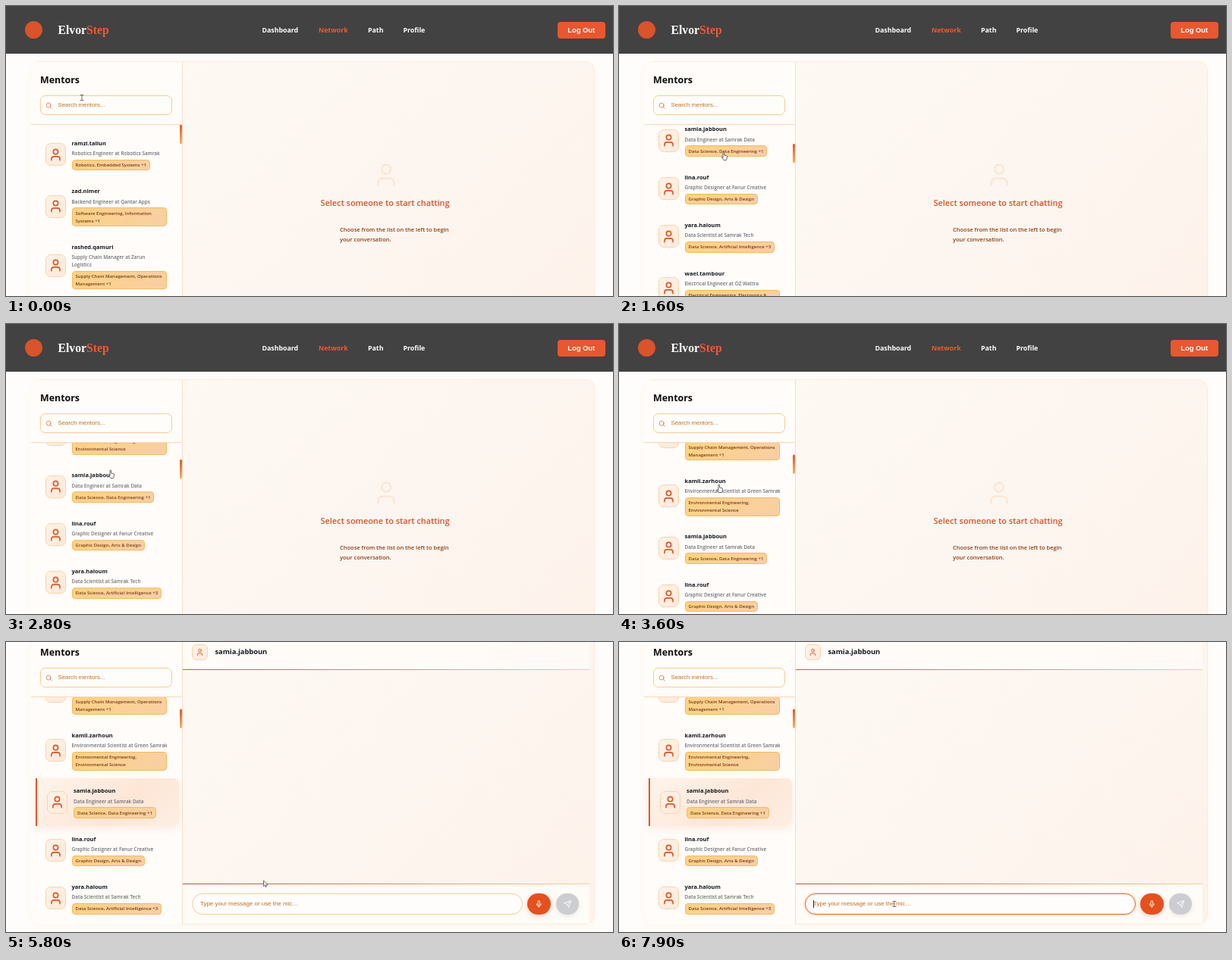
Animation, 800 px wide and 383 px high, one loop 8000 ms. Source, as an HTML page:

```html
<!DOCTYPE html>
<html lang="en">
<head>
<meta charset="utf-8">
<title>Mentor chat</title>
<style>
:root { --hot: #e5552b; --ink: #14181f; }
html, body { margin: 0; width: 100%; height: 100%; overflow: hidden; background: #fffdfb; }
body { position: relative; font-family: "Open Sans", "Noto Sans", sans-serif; }
#stage { position: absolute; left: 0; top: 0; width: 800px; height: 383px; overflow: hidden; }
#page { position: absolute; left: 0; top: 0; width: 800px; height: 467px; animation: page 8s linear infinite; }
#page *, .cursor { box-sizing: border-box; }
.at { position: absolute; }
.t { position: absolute; white-space: nowrap; line-height: 14px; font-weight: 600; }
.arial { font-family: "Liberation Sans", Arial, sans-serif; font-weight: 400; color: #c0701f; }
svg { display: block; fill: none; stroke: currentColor; stroke-width: 2; stroke-linecap: round; stroke-linejoin: round; }

/* top bar */
.bar { left: 0; top: 0; width: 800px; height: 63px; background: #424242; color: #fff; }
.bar .t { font-size: 8.8px; font-weight: 700; top: 25px; }
.bar .brand { left: 68.5px; top: 22px; font: 700 15.7px/19px "Liberation Serif", Times, serif; }
.brand b, .bar .on { color: #ee5a33; }
.logo { left: 25px; top: 20px; width: 23px; height: 23px; border-radius: 50%; background: #d9532b; }
.out { left: 726.5px; top: 21px; width: 63.5px; height: 21.5px; border-radius: 4px; background: #e8572f;
  font: 700 9.4px/21.5px "Liberation Sans", Arial, sans-serif; text-align: center; }

/* panel */
.panel { left: 32.5px; top: 73px; width: 743.5px; height: 384px; border: 1px solid #fdebdd; border-radius: 12px;
  background: linear-gradient(135deg, #fffaf5, #fdf6f0 55%, #fdf2ea); box-shadow: 0 2px 10px rgba(240,150,90,.07); }
.side { left: 33px; top: 74px; width: 199.5px; height: 382.5px; border-right: 1.5px solid #fbdcc4;
  border-radius: 11px 0 0 11px; background: #fffcf9; }
.search { left: 45px; top: 118px; width: 174px; height: 26px; border: 1px solid #f8cb94; border-radius: 7px; background: #fffdfa; }
.rule { left: 33px; top: 156px; width: 198px; height: 1.4px; background: #fbd6b4; }

/* mentor list */
.view { left: 33px; top: 157.4px; width: 198px; height: 299px; overflow: hidden; border-radius: 0 0 0 11px; }
.list { position: absolute; left: 5.5px; top: 7.6px; width: 189.5px; animation: list 8s linear infinite; }
.item { position: relative; display: flex; align-items: center; padding: 10px 0 10px 13px; margin-bottom: .9px; }
.face { flex: none; width: 27px; height: 30px; margin-right: 8px; border: 1px solid #fbd2ae; border-radius: 7px;
  background: linear-gradient(135deg, #fff3e6, #fdeadb); color: #dd5429; display: flex; align-items: center; justify-content: center; }
.face svg { width: 19px; height: 19px; }
.item > div { position: relative; }
.name { font-weight: 700; font-size: 7.5px; line-height: 13px; color: var(--ink); }
.role { margin: 2.2px 0 2.8px; font-weight: 600; font-size: 6.4px; line-height: 10px; color: #6d7078; white-space: nowrap; }
.tag { display: block; width: fit-content; padding: 1.25px 4px; border: 1px solid #f4b95c; border-radius: 4px;
  background: linear-gradient(135deg, #fcd284, #f9cfa4); font-weight: 600; font-size: 6.05px; line-height: 10px; color: #7a3813; white-space: nowrap; }
.tag.two { width: 125.5px; }
.picked { animation: nudge 8s linear infinite; }
.picked::before { content: ""; position: absolute; inset: 0; border-left: 2.5px solid var(--hot); border-radius: 0 8px 8px 0;
  background: linear-gradient(135deg, #fff4eb, #fde6d6 60%, #fdeee3); box-shadow: 0 4px 10px rgba(235,120,60,.12); animation: glow 8s linear infinite; }
.thumb { left: 228.5px; top: 157.3px; width: 3.2px; height: 24.5px; border-radius: 1px;
  background: linear-gradient(#e5552b, #f9b25f); animation: thumb 8s linear infinite; }

/* chat side */
.intro { animation: intro 8s step-end infinite; }
.chat { animation: chat 8s step-end infinite; }
.load { animation: load 8s step-end infinite; }
.send { animation: send 8s step-end infinite; }
.top { left: 232.5px; top: 74px; width: 536.5px; height: 46px; background: linear-gradient(90deg, #fffcf9, #fffaf5); }
.line { left: 232.5px; width: 536.5px; height: 1px; }
.foot { left: 232.5px; top: 404px; width: 536.5px; height: 52px; background: #fffbf7; }
.box { left: 245px; top: 416px; width: 436px; height: 28px; border: 1px solid #f8cb9c; border-radius: 14px; background: #fffdfb; }
.focus { border: 1.5px solid #e8632f; box-shadow: 0 0 0 1.5px #fde3d2; animation: focus 8s step-end infinite; }
.caret { left: 256px; top: 425px; width: .8px; height: 10px; background: #222; animation: caret 8s step-end infinite; }
.btn { top: 416px; width: 30.8px; height: 28px; border-radius: 14px; color: #fff; display: flex; align-items: center; justify-content: center; }
.btn svg { width: 10.5px; height: 10.5px; }

/* pointer */
.cursor { position: absolute; left: -8px; top: -8px; width: 16px; height: 16px; animation: move 8s linear infinite; }
.cursor svg { position: absolute; left: 0; top: 0; width: 16px; height: 16px; stroke: #444; stroke-width: .8; }
.beam { animation: beam 8s step-end infinite; }
.hand { fill: #fff; animation: hand 8s step-end infinite; }
.arrow { fill: #fff; animation: arrow 8s step-end infinite; }

@keyframes page {
  0%, 64.6% { transform: translateY(0); animation-timing-function: ease-in-out; }
  69.6%, 100% { transform: translateY(-84px); }
}
@keyframes list {
  0%, 8.75% { transform: translateY(0); animation-timing-function: ease-in-out; }
  18.5%, 33% { transform: translateY(-312px); animation-timing-function: ease-in-out; }
  35% { transform: translateY(-275px); }
  40.5%, 100% { transform: translateY(-194px); }
}
@keyframes thumb {
  0%, 8.75% { transform: translateY(0); animation-timing-function: ease-in-out; }
  18.5%, 33% { transform: translateY(25.2px); animation-timing-function: ease-in-out; }
  35% { transform: translateY(22.2px); }
  40.5%, 100% { transform: translateY(15.7px); }
}
@keyframes nudge {
  0%, 49% { padding-left: 13px; }
  51.5%, 100% { padding-left: 15.5px; }
}
@keyframes glow {
  0%, 49% { opacity: 0; }
  51.5%, 100% { opacity: 1; }
}
@keyframes intro { 0% { opacity: 1; } 52.5%, 100% { opacity: 0; } }
@keyframes chat { 0% { opacity: 0; } 52.5%, 100% { opacity: 1; } }
@keyframes load { 0% { opacity: 0; } 52.5% { opacity: 1; } 61.25%, 100% { opacity: 0; } }
@keyframes send { 0% { opacity: 0; } 61.25%, 100% { opacity: 1; } }
@keyframes focus { 0% { opacity: 0; } 86.25%, 100% { opacity: 1; } }
@keyframes caret { 0% { opacity: 0; } 86.25% { opacity: 1; } 92.5% { opacity: 0; } 98.7%, 100% { opacity: 1; } }
@keyframes move {
  0%, 1.25% { transform: translate(100px, 121px); animation-timing-function: ease-in-out; }
  8%, 40.5% { transform: translate(139px, 198px); animation-timing-function: ease-in-out; }
  44%, 45.6% { transform: translate(133px, 217px); animation-timing-function: ease-in-out; }
  50%, 58% { transform: translate(125px, 295px); animation-timing-function: ease-in-out; }
  64.4% { transform: translate(330px, 304px); animation-timing-function: ease-out; }
  71%, 74% { transform: translate(342px, 319.4px); animation-timing-function: ease-in-out; }
  81%, 100% { transform: translate(363px, 346px); }
}
@keyframes beam { 0% { opacity: 1; } 4% { opacity: 0; } 77.5%, 100% { opacity: 1; } }
@keyframes hand { 0% { opacity: 0; } 5% { opacity: 1; } 61%, 100% { opacity: 0; } }
@keyframes arrow { 0% { opacity: 0; } 4% { opacity: 1; } 5% { opacity: 0; } 61% { opacity: 1; } 77.5%, 100% { opacity: 0; } }
</style>
</head>
<body>
<svg width="0" height="0" style="position:absolute">
  <symbol id="user" viewBox="0 0 24 24"><circle cx="12" cy="7" r="4"/><path d="M5 21v-2a4 4 0 0 1 4-4h6a4 4 0 0 1 4 4v2"/></symbol>
</svg>
<div id="stage">
<div id="page">
  <div class="at bar">
    <div class="at logo"></div>
    <div class="t brand">Elvor<b>Step</b></div>
    <div class="t" style="left:337.5px">Dashboard</div>
    <div class="t on" style="left:412px">Network</div>
    <div class="t" style="left:477px">Path</div>
    <div class="t" style="left:523.5px">Profile</div>
    <div class="at out">Log Out</div>
  </div>

  <div class="at panel"></div>
  <div class="at side"></div>
  <div class="t" style="left:45px;top:90.5px;font-size:12.4px;font-weight:700;color:#0d0d0d">Mentors</div>
  <div class="at search"></div>
  <svg class="at" style="left:52px;top:126.5px;width:9px;height:9px;color:#dd6a38" viewBox="0 0 24 24"><circle cx="11" cy="11" r="8"/><path d="M17 17l5 5"/></svg>
  <div class="t arial" style="left:68.5px;top:123.5px;font-size:7.85px">Search mentors...</div>
  <div class="at rule"></div>

  <div class="at view"><div class="list">
    <div class="item"><div class="face"><svg><use href="#user"/></svg></div><div>
      <div class="name">ramzi.tallun</div><div class="role">Robotics Engineer at Robotics Samrak</div>
      <span class="tag">Robotics, Embedded Systems +1</span></div></div>
    <div class="item"><div class="face"><svg><use href="#user"/></svg></div><div>
      <div class="name">zad.nimer</div><div class="role">Backend Engineer at Qantar Apps</div>
      <span class="tag two">Software Engineering, Information<br>Systems +1</span></div></div>
    <div class="item"><div class="face"><svg><use href="#user"/></svg></div><div>
      <div class="name">rashed.qamuri</div><div class="role">Supply Chain Manager at Zarun<br>Logistics</div>
      <span class="tag two">Supply Chain Management, Operations<br>Management +1</span></div></div>
    <div class="item"><div class="face"><svg><use href="#user"/></svg></div><div>
      <div class="name">kamil.zarhoun</div><div class="role">Environmental Scientist at Green Samrak</div>
      <span class="tag two">Environmental Engineering,<br>Environmental Science</span></div></div>
    <div class="item picked"><div class="face"><svg><use href="#user"/></svg></div><div>
      <div class="name">samia.jabboun</div><div class="role">Data Engineer at Samrak Data</div>
      <span class="tag">Data Science, Data Engineering +1</span></div></div>
    <div class="item"><div class="face"><svg><use href="#user"/></svg></div><div>
      <div class="name">lina.rouf</div><div class="role">Graphic Designer at Fanur Creative</div>
      <span class="tag">Graphic Design, Arts &amp; Design</span></div></div>
    <div class="item"><div class="face"><svg><use href="#user"/></svg></div><div>
      <div class="name">yara.haloum</div><div class="role">Data Scientist at Samrak Tech</div>
      <span class="tag">Data Science, Artificial Intelligence +3</span></div></div>
    <div class="item"><div class="face"><svg><use href="#user"/></svg></div><div>
      <div class="name">wael.tambour</div><div class="role">Electrical Engineer at OZ Wattra</div>
      <span class="tag two">Electrical Engineering, Electronics &amp;<br>Communications</span></div></div>
  </div></div>
  <div class="at thumb"></div>

  <div class="intro">
    <svg class="at" style="left:482.5px;top:205px;width:36px;height:36px;color:#fbe5d2;stroke-width:1.5" viewBox="0 0 24 24"><use href="#user"/></svg>
    <div class="t" style="left:414.5px;top:253px;font-size:10.9px;color:#dc5129">Select someone to start chatting</div>
    <div class="t" style="left:440px;top:289px;font-size:7.5px;line-height:13px;color:#8b3d18">Choose from the list on the left to begin<br>your conversation.</div>
  </div>

  <div class="chat">
    <div class="at top"></div>
    <div class="at face" style="left:245px;top:87px;width:21px;height:21px;border-radius:6px"><svg style="width:11px;height:11px"><use href="#user"/></svg></div>
    <div class="t" style="left:275.5px;top:90px;font-size:9.3px;font-weight:700;color:var(--ink)">samia.jabboun</div>
    <div class="at line" style="top:120px;background:linear-gradient(90deg,#e5552b,#f0894a 50%,#f9cf92)"></div>
  </div>
  <div class="t load" style="left:472px;top:255px;font-size:7.9px;color:#df5d38">Loading chat...</div>

  <div class="send">
    <div class="at foot"></div>
    <div class="at line" style="top:403px;background:linear-gradient(90deg,#b0573c,#e8834f 50%,#f9cf9c)"></div>
    <div class="at box"></div>
    <div class="at box focus"></div>
    <div class="t arial" style="left:256px;top:423px;font-size:7.95px">Type your message or use the mic…</div>
    <div class="at caret"></div>
    <div class="at btn" style="left:687px;background:#e4511f;box-shadow:0 2px 6px rgba(229,85,43,.25)">
      <svg viewBox="0 0 24 24"><rect x="9" y="2" width="6" height="12" rx="3"/><path d="M5 11a7 7 0 0 0 14 0M12 18v4"/></svg></div>
    <div class="at btn" style="left:724.5px;background:#cccdd1;box-shadow:0 2px 5px rgba(120,120,130,.15)">
      <svg viewBox="0 0 24 24"><path d="M22 2L15 22l-4-9-9-4zM22 2L11 13"/></svg></div>
  </div>
</div>

<div class="cursor">
  <svg class="beam" viewBox="0 0 16 16"><path d="M6 4.5h1.4l.6.5.6-.5H10M8 5v6M6 11.5h1.4l.6-.5.6.5H10"/></svg>
  <svg class="hand" viewBox="0 0 16 16"><path d="M6 9V3.6a.8.8 0 0 1 1.6 0V7l3.2.7q1 .3.8 1.3l-.6 3.2-.7 1.4H7L4.2 9.9q.3-1.2 1.8.2z"/></svg>
  <svg class="arrow" viewBox="0 0 16 16"><path d="M5.5 4v7.2l1.7-1.5 1.1 2.5 1.1-.5-1.1-2.4h2.3z"/></svg>
</div>
</div>
</body>
</html>
```
